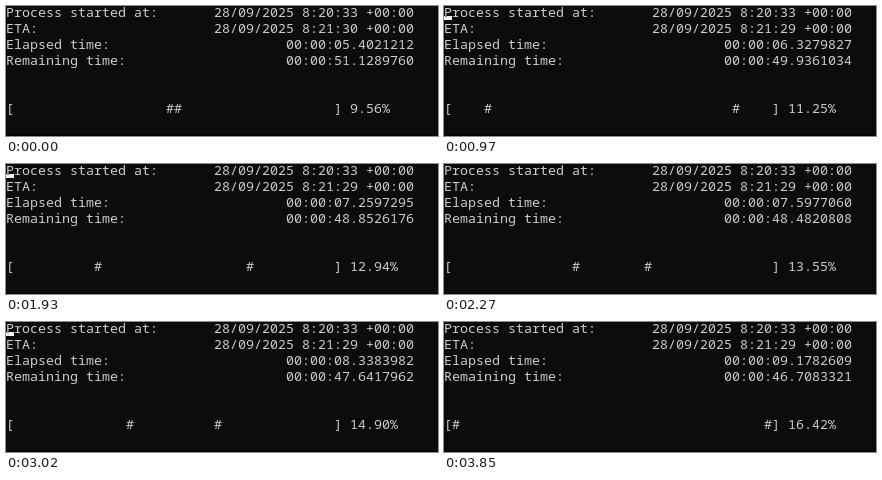
Animation of 432 by 130 pixels, one loop 3.91 s. Source, as an HTML page:

```html
<!DOCTYPE html>
<html lang="en">
<head>
<meta charset="utf-8">
<title>Console progress</title>
<style>
  html, body { margin: 0; width: 100%; height: 100%; overflow: hidden; background: #0c0c0c; }
  svg { display: block; isolation: isolate; }
  text {
    font-family: "Noto Sans Mono", "DejaVu Sans Mono", monospace;
    font-size: 13.3333px;
    fill: #ccc;
    white-space: pre;
  }
  #cursor { fill: #fff; mix-blend-mode: difference; }
</style>
</head>
<body>
<svg id="stage" width="432" height="130" viewBox="0 0 432 130">
  <rect width="432" height="130" fill="#0c0c0c"/>
  <rect y="129" width="432" height="1" fill="#050306"/>
</svg>
<script>
const LOOP = 3910, CELL = 8, LINE = 16, BASE = 11;
const LAST = 56, STEPS = 61;
const BLINK = 600, BLINK_START = 400;
const TICKS = 1e7;

// step, elapsed ticks, remaining ticks
const clock = [
  [0, 54021212, 511289760],
  [6, 57753674, 506472658],
  [14, 63279827, 499361034],
  [28, 72597295, 488526176],
  [39, 80032777, 480374367],
  [50, 87405428, 471670275],
  [56, 91782609, 467083321]
];

// Redraws come every 70 ms, with a few short and one long
const short = new Set([3, 18, 20, 22, 32, 34, 37, 49, 56]);
const starts = [];
for (let i = 0, t = 0; i <= LAST; i++) {
  starts.push(t);
  t += short.has(i) ? 60 : i === 14 ? 80 : 70;
}

const stage = document.getElementById("stage");

function add(tag, attrs, content = "") {
  const node = document.createElementNS("http://www.w3.org/2000/svg", tag);
  for (const key in attrs) node.setAttribute(key, attrs[key]);
  node.textContent = content;
  return stage.appendChild(node);
}

const put = (col, row, content) =>
  add("text", { x: col * CELL, y: BASE + row * LINE }, content);

["Process started at:", "ETA:", "Elapsed time:", "Remaining time:"]
  .forEach((label, row) => put(0, row, label));
put(26, 0, "28/09/2025 8:20:33 +00:00");
put(0, 6, "[");
put(41, 6, "]");
const eta = put(26, 1);
const elapsed = put(35, 2);
const remaining = put(35, 3);
const left = put(20, 6, "#");
const right = put(21, 6, "#");
const percent = put(43, 6);
const cursor = add("rect", { id: "cursor", x: 0, y: 10, width: CELL, height: 4 });

function span(ticks) {
  const sec = Math.floor(ticks / TICKS);
  return "00:00:" + String(sec).padStart(2, "0") + "." +
    String(ticks % TICKS).padStart(7, "0");
}

function readClock(step) {
  let i = 0;
  while (i < clock.length - 2 && step >= clock[i + 1][0]) i++;
  const a = clock[i], b = clock[i + 1];
  const f = (step - a[0]) / (b[0] - a[0]);
  return [1, 2].map(c => Math.round(a[c] + (b[c] - a[c]) * f));
}

// Distance of each mark from the middle: out, back, then a jump to the ends
function spread(k) {
  const p = k % 42;
  if (p === 41) return 19;
  if (p === 40) return 0;
  return p < 20 ? p : 39 - p;
}

function draw(time) {
  const t = time % LOOP;
  let step = LAST;
  while (starts[step] > t) step--;

  const [gone, rest] = readClock(step);
  const total = gone + rest;
  const second = total > 56.34 * TICKS ? 30 : 29;
  eta.textContent = `28/09/2025 8:21:${second} +00:00`;
  elapsed.textContent = span(gone);
  remaining.textContent = span(rest);
  percent.textContent = (100 * gone / total).toFixed(2) + "%";

  const d = spread(Math.floor(step * STEPS / LAST));
  left.setAttribute("x", (20 - d) * CELL);
  right.setAttribute("x", (21 + d) * CELL);

  const phase = Math.floor((starts[step] - BLINK_START) / BLINK);
  cursor.setAttribute("visibility", phase >= 0 && phase % 2 === 0 ? "visible" : "hidden");
}

const begin = performance.now();
function tick() {
  draw(performance.now() - begin);
  requestAnimationFrame(tick);
}
tick();
</script>
</body>
</html>
```
